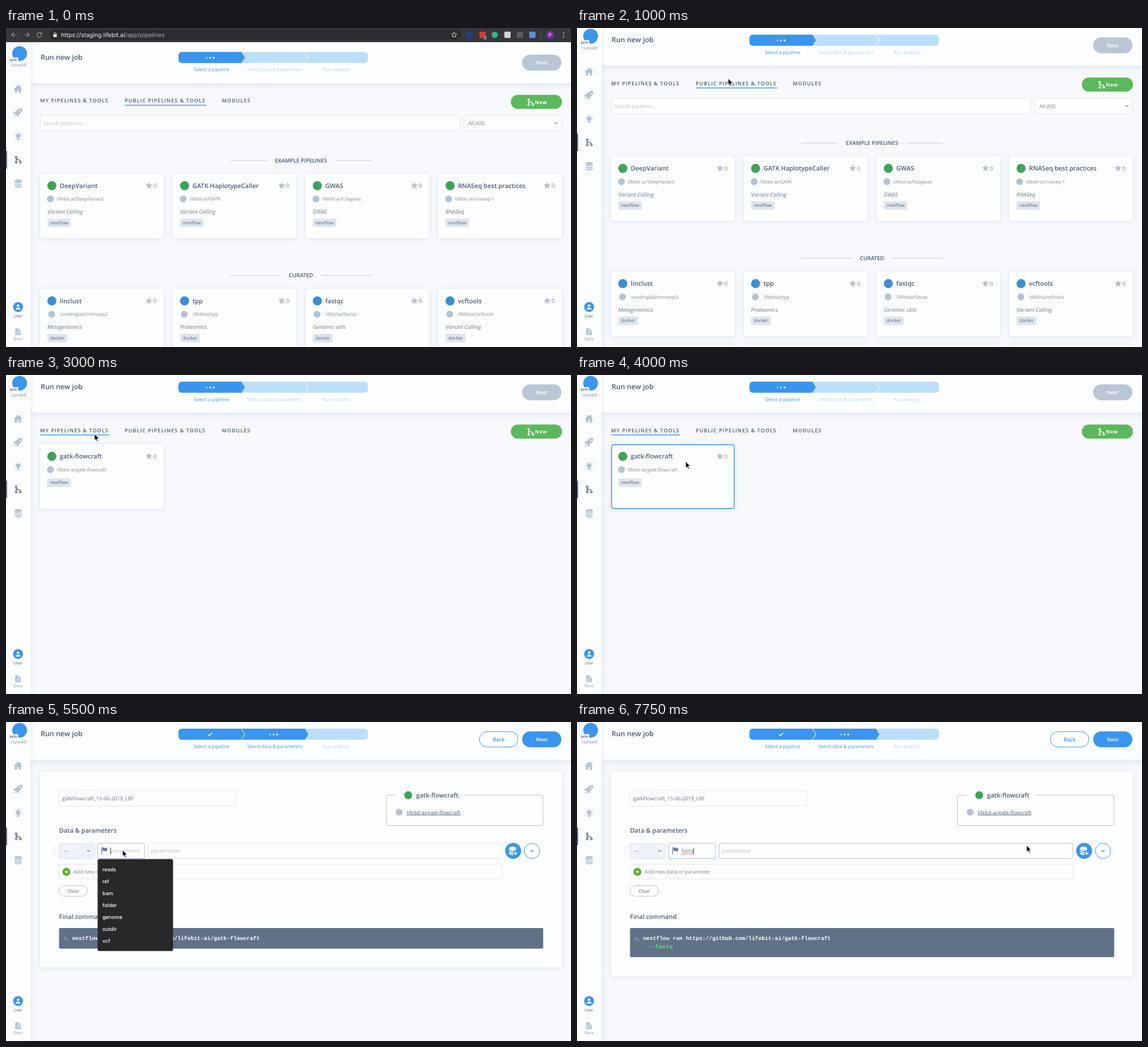
An HTML page for the animation above (8000 ms loop, 996 by 562 pixels).

```html
<!DOCTYPE html>
<html lang="en">
<head>
<meta charset="utf-8">
<title>Run new job</title>
<style>
html, body { margin: 0; width: 100%; height: 100%; overflow: hidden; background: #f7f9fc; }
svg { display: block; width: 100vw; height: 100vh; font-family: "Open Sans", sans-serif; }
text { white-space: pre; text-rendering: geometricPrecision; }
.ui { font-family: Inter, sans-serif; }
.mono { font-family: "Liberation Mono", monospace; }
.card { fill: #fdfeff; filter: drop-shadow(0 1px 5px rgba(85, 115, 165, .16)); }
.header { fill: #fdfeff; filter: drop-shadow(0 2px 7px rgba(85, 115, 165, .17)); }
.side { fill: #fcfdff; filter: drop-shadow(1px 0 5px rgba(85, 115, 165, .14)); }
</style>
</head>
<body>
<svg id="stage" viewBox="0 0 996 562" preserveAspectRatio="none"></svg>
<script>
const BLUE = '#3b95ee', PALE = '#bcdff9', INK = '#4c5b72', GREY = '#b5c2d1', MUTED = '#7b8898',
  EDGE = '#e0e6ef', GREEN = '#3fa35b', LOOP = 8000, STEP = 250;

// Text is placed by its vertical centre.
const text = (x, y, s, size = 9, fill = INK, more = '') =>
  `<text x="${x}" y="${y + size * .357}" font-size="${size}" fill="${fill}" ${more}>${s}</text>`;
const rect = (x, y, w, h, r, fill, more = '') =>
  `<rect x="${x}" y="${y}" width="${w}" height="${h}" rx="${r}" fill="${fill}" ${more}/>`;
const circle = (x, y, r, fill, more = '') => `<circle cx="${x}" cy="${y}" r="${r}" fill="${fill}" ${more}/>`;
const path = (d, fill, more = '') => `<path d="${d}" fill="${fill}" ${more}/>`;
const line = (d, color, width = 1, more = '') => path(d, 'none', `stroke="${color}" stroke-width="${width}" ${more}`);
const group = (id, body) => `<g id="${id}">${body}</g>`;
const at = (x, y, body) => `<g transform="translate(${x} ${y})">${body}</g>`;
const stroke = c => `stroke="${c}"`;
const MID = 'text-anchor="middle"', SEMI = 'font-weight="600"', MIDSEMI = `${MID} ${SEMI}`;
const chevron = (x, y) => line(`M${x - 2.5} ${y - 1.2}l2.5 2.5 2.5-2.5`, '#66758a', 1.1);

function star(x, y, r, more) {
  let d = '';
  for (let i = 0; i < 10; i++) {
    const a = i * Math.PI / 5 - Math.PI / 2, q = i % 2 ? r * .48 : r;
    d += (i ? 'L' : 'M') + (x + q * Math.cos(a)).toFixed(2) + ' ' + (y + q * Math.sin(a)).toFixed(2);
  }
  return path(d + 'Z', more ? 'none' : GREY, more || '');
}

const branch = (x, y, color) => at(x, y,
  line('M-3.5-3V3M-3.5-2c0 3 7 .5 7 5', color, 1.4) +
  [[-3.5, -4.5], [-3.5, 4.5], [3.8, 4.5]].map(([a, b]) => circle(a, b, 1.6, 'none', `stroke="${color}" stroke-width="1.3"`)).join(''));

const database = (x, y, color) => at(x, y,
  `<ellipse cy="-4.6" rx="6.2" ry="2.4" fill="${color}"/>` +
  [-2.8, 1, 4.6].map(v => path(`M-6.2 ${v - .6}q6.2 3.6 12.4 0v2.1q-6.2 3.8-12.4 0z`, color)).join(''));

function browserBar() {
  const addons = [[817, '#283a8f'], [840, '#d93a37'], [884, '#d5d7da'], [906, '#5b5d61'], [928, '#5d8fe0']]
    .map(([x, c]) => rect(x - 5.5, 6.5, 11, 11, 1.5, c)).join('');
  return rect(0, 0, 996, 25, 0, '#36373b') + rect(76, 2.5, 727, 19, 9.5, '#2b2c30') +
    line('M19 12H10M14 8l-4 4 4 4', '#8f9196', 1.2) + line('M32 12h9M37 8l4 4-4 4', '#8f9196', 1.2) +
    line('M62 9.5a4 4 0 1 0 .8 3.5M62.8 7.5v3h-3', '#9a9ca0', 1.2) +
    rect(83.5, 11, 6, 5, .8, '#e8eaed') + line('M84.8 11v-1.5a1.7 1.7 0 0 1 3.4 0V11', '#e8eaed') +
    text(97, 12, 'https://staging.lifebit.ai<tspan fill="#a9abaf">/app/pipelines</tspan>', 10.4, '#f1f2f4', 'class="ui"') +
    star(790, 12, 5, 'stroke="#d0d2d5"') + addons + circle(861.5, 12, 5.5, '#35b586') +
    rect(841, 13, 7, 8, 1.5, '#55575b') + text(844.5, 17, '2', 6.5, '#fff', `class="ui" ${MID}`) +
    line('M943.5 5v14', '#55575b') + circle(959, 12, 7, '#7b2fa0') + text(959, 12, 'P', 8, '#fff', `class="ui" ${MID}`) +
    [8, 12, 16].map(y => circle(983, y, 1.1, '#c6c8cb')).join('');
}

function sideTop() {
  return circle(24, 14.5, 13, BLUE) +
    `<g transform="rotate(-4 13 26)">${rect(4.5, 22, 17, 7.5, 1.5, '#fff', stroke('#dbe2ec'))}${text(13, 25.8, 'BETA', 5, INK, `${MID} font-weight="700"`)}</g>` +
    text(22.5, 35, 'runvelt', 8.3, '#7f8fa4', MID) +
    path('M13.5 77.5L21 70l2.8 2.8V71h2v3.8l2.7 2.7h-2V84h-4v-4.5h-3V84h-4v-6.5z', GREY) +
    path('M28.5 111C23 111 20 113 17.5 116.5L14.5 117 13 121l3.5-.2 2.5 2.5-.2 2.7 3.7-1.5.5-3C27 119 29 116 28.5 111zM15.5 122L13 126l4.5-2z', GREY) +
    circle(24.3, 115.5, 1.3, '#fff') +
    circle(21.5, 159.5, 4.3, GREY) + rect(19.5, 164, 4, 3, 1, GREY) +
    circle(21.5, 160, 6.9, 'none', `stroke="${GREY}" stroke-width="1.5" stroke-dasharray="1.3 4.12"`) +
    rect(0, 186, 2, 31, 0, '#64738b') + branch(21.5, 201.5, '#526178') + database(21.5, 243, GREY);
}

const sideBottom = () =>
  circle(21.3, 491.5, 8.7, BLUE) + circle(21.3, 489.3, 2.2, '#fff') +
  path('M17 496c0-4.6 8.6-4.6 8.6 0z', '#fff') + text(21.3, 507.7, 'User', 7, INK, MID) +
  path('M16.3 529h6l3.7 3.7V541h-9.7z', GREY) + line('M22 529v4h4', '#fff', .8) +
  line('M18.3 535.5h5.5M18.3 538h5.5', '#fff', .8) + text(21.3, 547.3, 'Docs', 7, '#7f8fa4', MID);

function header(active) {
  const end = 415 + 112 * active, edge = 415 + 112 * (1 - active), dots = 359.5 + 112 * active;
  const labels = [[362.5, 'Select a pipeline'], [474, 'Select data &amp; parameters'], [582, 'Run analysis']];
  return at(0, 11.8, rect(304, 0, 334, 19.4, 6, PALE) +
      path(`M310 0H${end}l6 9.7-6 9.7H310a6 6 0 0 1-6-6V6a6 6 0 0 1 6-6z`, BLUE) +
      line(`M${edge} 0l6 9.7-6 9.7`, '#fff')) +
    [.5, .8, 1].map((o, i) => circle(dots - 6 + 6.3 * i, 22, 1.7, '#fff', `opacity="${o}"`)).join('') +
    (active ? line('M356 21.5l2.5 2.5 5-5', '#fff', 1.7) : '') +
    labels.map(([x, s], i) => text(x, 42.7, s, 8.3, i <= active ? BLUE : '#add5f7', MID)).join('') +
    (active ? rect(834.5, 17, 68, 27, 13.5, '#fff', stroke(BLUE)) + text(868.5, 30.5, 'Back', 9, BLUE, MIDSEMI) : '') +
    rect(910, 16.5, 69, 28, 14, active ? BLUE : '#bac6d5') + text(944.5, 30.5, 'Next', 9, '#fff', MIDSEMI);
}

const TAB = `${SEMI} letter-spacing="1.04"`;
const tabs = () =>
  text(60.3, 97.5, 'MY PIPELINES &amp; TOOLS', 9, INK, TAB + ' id="myTab"') +
  text(209.3, 97.5, 'PUBLIC PIPELINES &amp; TOOLS', 9, INK, TAB) + text(380.5, 97.5, 'MODULES', 9, INK, TAB) +
  `<rect id="tabLine" y="104.9" height="1.4" fill="${BLUE}"/>` +
  rect(890, 87.2, 90, 24.9, 12.45, '#5cb85c') + branch(925, 100, '#fff') +
  text(932.5, 100, 'New', 8.6, '#fff', 'font-weight="700" letter-spacing=".8"');

function card(x, y, [title, repo, kind], tag, more = '') {
  const docker = tag === 'docker', tagY = kind ? 79 : 60;
  return at(x, y, rect(0, 0, 217.5, 113.5, 4, '', 'class="card"') + more +
    circle(20.5, 21, 8, docker ? '#3d8fd1' : GREEN) +
    text(34.5, 21, title, 11.07, INK, SEMI) + star(191.7, 21, 6.3) + text(199.5, 21, '0', 9.68, MUTED) +
    circle(docker ? 20 : 18, 44.5, 6, GREY) + text(docker ? 35.5 : 29.5, 44.5, repo, 8.3, MUTED) +
    (kind ? text(12.5, 67, kind, 9.68, '#6d7a89', 'font-style="italic"') : '') +
    rect(12.5, tagY, docker ? 35 : 41.5, 15, 2, '#dee5ee') +
    text(docker ? 30 : 33.2, tagY + 7.3, tag, 8, '#55647a', MID));
}

function publicList() {
  const column = i => 60.3 + 234 * i;
  const title = (y, s, half) => text(520, y, s, 9.6, INK, MIDSEMI) +
    line(`M395 ${y}H${520 - half}M${520 + half} ${y}H645`, '#c0cad5');
  const examples = [['DeepVariant', 'lifebit-ai/DeepVariant', 'Variant Calling'],
    ['GATK HaplotypeCaller', 'lifebit-ai/GATK', 'Variant Calling'],
    ['GWAS', 'lifebit-ai/h3agwas', 'GWAS'], ['RNASeq best practices', 'lifebit-ai/rnaseq-1', 'RNASeq']];
  const curated = [['linclust', 'soedinglab/mmseqs2', 'Metagenomics'], ['tpp', 'lifebitai/tpp', 'Proteomics'],
    ['fastqc', 'lifebitai/fastqc', 'Genomic utils'], ['vcftools', 'lifebitai/vcftools', 'Variant Calling']];
  return rect(60.5, 123.5, 739, 27.5, 2, '#fdfeff', stroke(EDGE)) + text(65.5, 137.3, 'Search pipelines...', 9, '#bac3cf') +
    rect(807.5, 123.5, 172, 27.5, 2, '#fdfeff', stroke(EDGE)) + text(815, 137.3, 'All (60)', 9, '#6c7b90') + chevron(969.5, 137) +
    title(202.7, 'EXAMPLE PIPELINES', 60) + title(405.5, 'CURATED', 36) +
    examples.map((c, i) => card(column(i), 226.3, c, 'nextflow')).join('') +
    curated.map((c, i) => card(column(i), 429.3, c, 'docker') +
      rect(column(i), 559.5, 217.5, 113.5, 4, '', 'class="card"')).join('');
}

const myList = () => card(60.3, 122.3, ['gatk-flowcraft', 'lifebit-ai/gatk-flowcraft'], 'nextflow',
  rect(.7, .5, 216, 112.5, 4, 'none', `id="cardEdge" stroke="${BLUE}" stroke-width="1.5"`));

function form() {
  const hint = '#b9c2ce', box = (x, y, w, h, more = stroke(EDGE), fill = '#fdfeff') => rect(x, y, w, h, 2, fill, more);
  let grip = '';
  for (let i = 0; i < 8; i++) grip += circle(83.5 + 3.5 * (i % 2), 221.5 + 3.2 * (i >> 1), .7, '#c3ccd8');
  return rect(60.3, 87, 919.7, 345.5, 4, '', 'class="card" id="panel"') +
    box(93.5, 121, 311.5, 27) + text(99, 134.5, 'gatkFlowcraft_15-06-2019_LBF', 9, '#66758a') +
    line('M687 129H672.5q-2 0-2 2v49.5q0 2 2 2h272q2 0 2-2V131q0-2-2-2H806.5', '#b8c4d2') +
    circle(709, 129, 7, GREEN) + text(723, 129, 'gatk-flowcraft', 11.07, INK, SEMI) + circle(693, 159, 6, GREY) +
    text(706.5, 159.3, 'lifebit-ai/gatk-flowcraft', 9, INK, 'text-decoration="underline"') +
    text(93.5, 191, 'Data &amp; parameters', 11.07, INK, SEMI) + grip +
    box(93.5, 213.5, 62, 27, stroke('#dde4ee'), '#eff2f7') + text(102, 227, '--', 9.5, INK, 'letter-spacing=".8"') + chevron(145.5, 227) +
    box(161.5, 213.5, 82.5, 27, 'id="param"') +
    path('M168 221h1.3v12H168zM170 221.5c3-1.5 4.5 1.5 8.3 0v6c-3.8 1.5-5.3-1.5-8.3 0z', '#6f7e93') +
    text(184, 227, 'paramName', 9, hint, 'id="paramHint"') + text(184, 227, '', 9, '#66758a', 'id="typed"') +
    line('M0 221.5v11.5', '#333', .9, 'id="caret"') + line('', '#e0483c', 1.3, 'id="spell" stroke-dasharray="1.3 1"') +
    box(250.5, 213.5, 623.5, 27, 'id="value"') + text(255.5, 227, 'paramValue', 9, hint) +
    circle(894, 227, 14, BLUE) + database(893, 226.5, '#fff') + circle(898.5, 231.5, 4.2, BLUE) + line('M895.5 231.5h6M898.5 228.5v6', '#fff', 1.4) +
    circle(927.3, 227, 13.5, '#fff', stroke(BLUE)) + line('M924.5 227h5.5', '#2f7fd0', 1.5) +
    box(93.5, 250.5, 781, 26) + circle(106.5, 264, 7, '#63ad33') + line('M103.5 264h6M106.5 261v6', '#fff', 1.2) +
    text(119, 264, 'Add new data or parameter', 9, MUTED) +
    rect(93.5, 288.5, 50, 18.5, 9.25, '#fff', stroke('#b3bfce')) + text(118.5, 298, 'Clear', 8.6, '#5f6e84', MID) +
    text(93.5, 343.5, 'Final command', 11.07, INK, SEMI) +
    rect(93.5, 363, 853.5, 36.3, 2, '#617187', 'id="command"') +
    line('M103 379l2.5 2-2.5 2M106.5 384h3', '#dfe5ec', .9) +
    text(116.5, 380.5, 'nextflow run https://github.com/lifebit-ai/gatk-flowcraft', 9.68, '#fff', 'class="mono" font-weight="700"') +
    text(125, 395, '', 10.4, '#69d67f', 'class="mono" font-weight="700" id="flag"') +
    group('history', '');
}

const $ = id => document.getElementById(id);
const show = (id, on) => $(id).setAttribute('display', on ? 'inline' : 'none');
const set = (id, attrs) => { for (const k in attrs) $(id).setAttribute(k, attrs[k]); };

$('stage').innerHTML = `<rect width="996" height="562" fill="#f7f9fc"/>` +
  group('main', group('tabs', tabs()) + group('publicList', publicList()) + group('myList', myList()) + group('form', form()) +
    rect(43, -20, 960, 86.5, 0, '', 'class="header"') + text(61, 21, 'Run new job', 12.45, INK, SEMI) +
    group('header0', header(0)) + group('header1', header(1))) +
  rect(-10, -10, 53.5, 590, 0, '', 'class="side"') + group('sideTop', sideTop()) + sideBottom() + group('bar', browserBar()) +
  group('cursor', path('M0 0v11.2l2.6-2.3 1.8 4.1 1.9-.8-1.8-4h3.6z', '#000', 'stroke="#fff" stroke-width=".8"'));

// Pointer stops: time, x, y
const POINTER = [[750, 290, 62], [1000, 266.5, 89], [1250, 214, 95], [1500, 171, 99], [1750, 165, 99], [2250, 156.5, 101],
  [3000, 156, 104], [3250, 163, 118], [3500, 178, 138], [3750, 188, 149], [4000, 191.5, 152.5], [4500, 200, 174],
  [4750, 208.5, 195], [5000, 207, 219], [5250, 205.5, 225.5], [7250, 310, 226], [7500, 630, 222], [7750, 792.5, 217.5]];
const TYPING = [[6000, 'f'], [6500, 'fa'], [6750, 'fast'], [7000, 'fastq']];
const HISTORY = ['reads', 'ref', 'bam', 'folder', 'genome', 'outdir', 'vcf'];
const latest = (table, t) => table.filter(row => row[0] <= t).pop();

function drawHistory(items) {
  $('history').innerHTML = items.length ? rect(161.5, 241.5, 133, 15 + 21 * items.length, 3, '#27282a') +
    items.map((s, i) => text(170, 259.8 + 21 * i, s, 9, '#fff', 'class="ui" font-weight="500"')).join('') : '';
}

function render(t) {
  const shift = `translate(0 ${t < 500 ? 30.5 : 0})`, mine = t >= 2750, step2 = t >= 4250;
  set('main', { transform: shift });
  set('sideTop', { transform: shift });
  show('bar', t < 500);
  show('header0', !step2);
  show('header1', step2);
  show('tabs', !step2);
  show('publicList', !mine);
  show('myList', t >= 3000 && !step2);
  show('cardEdge', t >= 3500);
  show('form', step2);
  set('myTab', { fill: t >= 2250 && !mine ? BLUE : INK });
  set('tabLine', mine ? { x: 60.3, width: 121.7 } : { x: 209.3, width: 144 });

  const spot = latest(POINTER, t);
  show('cursor', spot);
  if (spot) set('cursor', { transform: `translate(${spot[1]} ${spot[2]})` });

  const word = (latest(TYPING, t) || [0, ''])[1], grow = word ? 15 : 0, focus = t >= 5250;
  $('typed').textContent = word;
  $('flag').textContent = word && '--' + word;
  set('panel', { height: 345.5 + grow });
  set('command', { height: 36.3 + grow });
  set('param', { stroke: focus ? '#a9bde2' : '#e2574c' });
  set('value', { stroke: t >= 7500 ? '#b4c2e0' : EDGE });
  show('paramHint', !word);
  show('caret', focus);
  show('spell', word.length > 1);
  const width = word ? $('typed').getComputedTextLength() : 0;
  set('caret', { transform: `translate(${184.5 + width} 0)` });
  set('spell', { d: `M184 232.5h${width}` });
  drawHistory(word === 'f' ? ['folder'] : focus && !word ? HISTORY : []);
}

const start = performance.now();
let last = -1;
function tick() {
  const t = Math.floor((performance.now() - start) % LOOP / STEP) * STEP;
  if (t !== last) render(last = t);
  requestAnimationFrame(tick);
}
tick();
</script>
</body>
</html>
```
